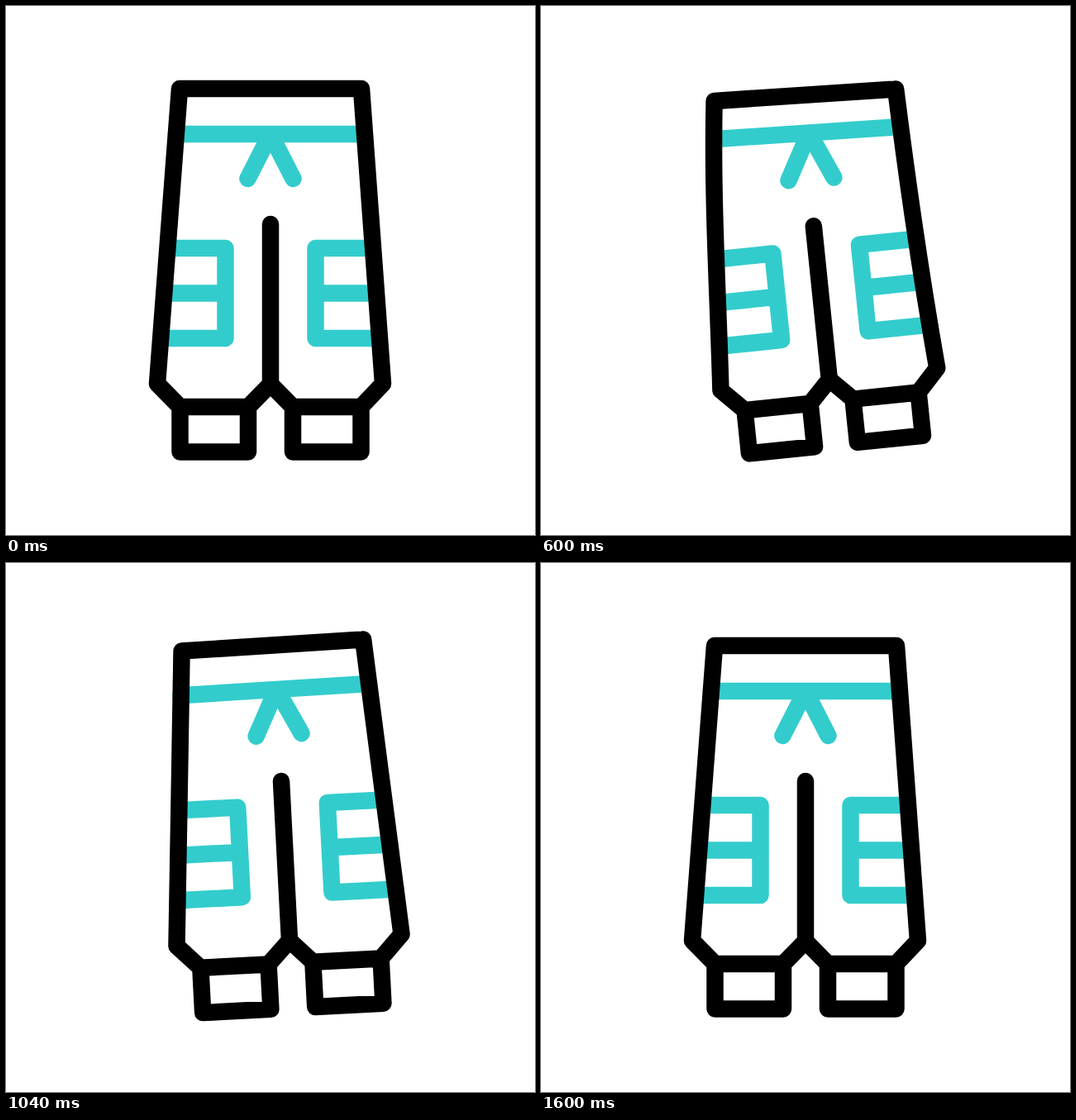
Recreate the animation shown at these times as an HTML page. Size 640 by 640 pixels, loop 2.4 s.

```html
<!DOCTYPE html>
<html lang="en">
<head>
<meta charset="utf-8">
<title>Trousers</title>
<style>
  html, body { margin: 0; width: 100%; height: 100%; overflow: hidden; background: #fff; }
  svg { display: block; width: 100%; height: 100%; }
  path { fill: none; stroke-width: 20.5; stroke-linecap: round; stroke-linejoin: round; }
</style>
</head>
<body>
<svg viewBox="0 0 640 640">
  <path id="trim" stroke="#33cccc"/>
  <path id="outline" stroke="#000"/>
</svg>
<script>
const LOOP = 2400, STEP = 20;
const SWING = 455, BACK = 737, SETTLE = 1100;

const linear = u => u;
const sine = u => (1 - Math.cos(Math.PI * u)) / 2;

// eased value at time t along [time, value] stops
function track(t, stops, ease = sine) {
  let [from, value] = stops[0];
  for (const [to, next] of stops.slice(1)) {
    if (t < to) return value + (next - value) * ease(Math.max(0, (t - from) / (to - from)));
    [from, value] = [to, next];
  }
  return value;
}

function turn(x, y, deg, scale = 1) {
  const r = deg * Math.PI / 180, c = Math.cos(r) * scale, s = Math.sin(r) * scale;
  return [x * c - y * s, x * s + y * c];
}
const add = (p, q) => [p[0] + q[0], p[1] + q[1]];
const mix = (p, q, u) => [p[0] + (q[0] - p[0]) * u, p[1] + (q[1] - p[1]) * u];
const fmt = p => p.map(n => n.toFixed(2)).join(" ");
const line = (...pts) => "M" + pts.map(fmt).join("L");
const curve = ([a, b, c, d]) => `M${fmt(a)}C${fmt(b)} ${fmt(c)} ${fmt(d)}`;

function onCurve([a, b, c, d], u) {
  const m = mix(b, c, u);
  return mix(mix(mix(a, b, u), m, u), mix(m, mix(c, d, u), u), u);
}

// the legs bend away from the waist while the whole figure leans about it
function pose(t) {
  const bend = track(t, [[0, 0], [SWING, 1], [BACK, -.66], [SETTLE, 0]]);
  const lean = track(t, [[SWING, 0], [SETTLE, -5]], linear)
    + track(t, [[SETTLE, 0], [1305, 7], [1600, 5]]);
  const slide = track(t, [[SWING, 0], [600, 4], [900, 4], [SETTLE, 0]]);
  const squash = track(t, [[SWING, 0], [600, 1], [900, -.6], [SETTLE, 0]]);

  const size = Math.abs(bend), drop = size ** 1.35;
  const place = (x, y) => add([320 + slide, 100], turn(x, y, lean));
  return {
    waist: place(-36 * bend, 24.5 * drop + 6 * squash),
    crotch: place(19 * bend, 164 + 6 * drop + 2 * Math.abs(squash)),
    tilt: lean - 20 * bend,
    swing: lean - 35.7 * bend,
    scale: 1 - .05 * size * (1 - size) - .03 * Math.max(0, squash),
    beltAt: .154 - .031 * size - .02 * Math.abs(squash)
  };
}

const trim = document.getElementById("trim");
const outline = document.getElementById("outline");

function draw(t) {
  const { waist, crotch, tilt, swing, scale, beltAt } = pose(t);
  const leg = (x, y) => add(crotch, turn(x - 320, y - 264, swing, scale));
  const legLine = (...pts) => line(...pts.map(p => leg(...p)));

  // side seam: curves from the waist tilt into the leg swing
  const side = (dx, flare) => {
    const top = add(waist, turn(dx, 0, tilt));
    const hip = leg(320 + dx + flare, 457);
    return [
      top,
      add(top, turn(flare / 3, 119, tilt * .8)),
      add(hip, turn(-flare / 3, -119, swing, scale)),
      hip
    ];
  };
  const left = side(-110, -27), right = side(110, 26);

  const beltL = onCurve(left, beltAt), beltR = onCurve(right, beltAt);
  const knot = mix(beltL, beltR, .5 - .0025 * tilt);
  const tips = mix(knot, crotch, .495);
  const tip = dx => add(tips, turn(dx, 0, tilt));

  const pocket = (x, end, flare) =>
    legLine([end, 293], [x, 293], [x, 402], [end + 2 * flare, 402]) +
    legLine([x, 347.5], [end + flare, 347.5]);
  const cuff = x => legLine([x, 485], [x + 82.5, 485], [x + 82.5, 539.5], [x, 539.5]) + "Z";

  trim.setAttribute("d",
    line(beltL, beltR) + line(tip(-27.5), knot, tip(27.5)) +
    pocket(265.5, 200, -4) + pocket(374.5, 443, 4.5));

  outline.setAttribute("d",
    line(left[0], right[0]) + curve(left) + curve(right) +
    legLine([183, 457], [210.5, 485]) + legLine([293, 485], [320, 457.5], [347, 485]) +
    legLine([429.5, 485], [456, 457]) + legLine([320, 264], [320, 457.5]) +
    cuff(210.5) + cuff(347));
}

const start = performance.now();
function tick() {
  const t = Math.max(0, performance.now() - start) % LOOP;
  draw(Math.floor(t / STEP) * STEP);
  requestAnimationFrame(tick);
}
tick();
</script>
</body>
</html>
```
